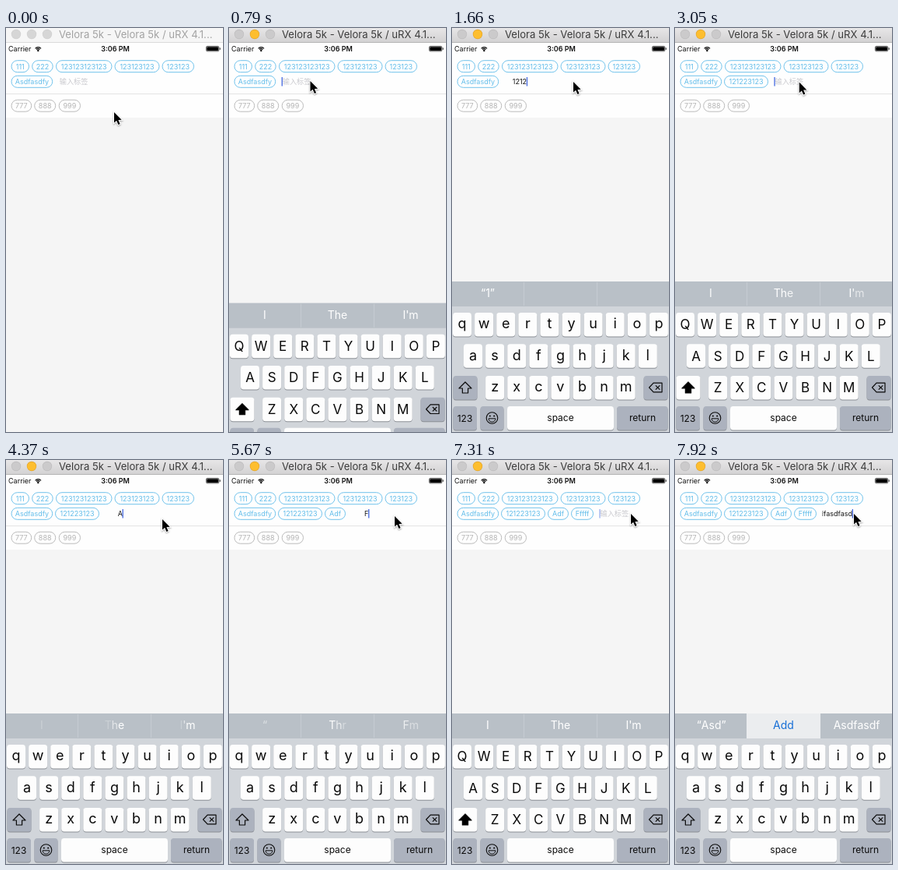
Write an HTML page with a canvas that moves like this. It is 279 by 518 pixels and loops after 8 s.

```html
<!DOCTYPE html>
<html lang="en">
<head>
<meta charset="utf-8">
<title>Tag input</title>
<style>
html, body { margin: 0; width: 100%; height: 100%; overflow: hidden; background: #f5f5f5; }
canvas { display: block; width: 279px; height: 518px; }
</style>
</head>
<body>
<canvas id="stage"></canvas>
<script>
const W = 279, H = 518, LOOP = 8000;
const canvas = document.getElementById('stage');
const ratio = window.devicePixelRatio || 1;
canvas.width = W * ratio;
canvas.height = H * ratio;
const c = canvas.getContext('2d');
const SANS = 'Inter, "Noto Sans CJK SC", "Noto Sans CJK", sans-serif';
const FOCUS = 610;
const BLUE = '#62bdea', GRAY = '#b4b4b4';

// Tags: left, width, label, time of appearance
const firstRow = [[7, 22.5, '111'], [33.7, 26.5, '222'], [64.5, 71.5, '123123123123'],
  [140, 57, '123123123'], [201, 40.5, '123123']];
const secondRow = [[7, 52.7, 'Asdfasdfy', 0], [63.5, 56, '121223123', 2920],
  [123.5, 26, 'Adf', 5000], [153.5, 28, 'Fffff', 6480]];
const thirdRow = [[7, 25.7, '777'], [36.7, 27, '888'], [68.2, 27.3, '999']];

// Typing: start, text, ms per key, time it is committed
const typing = [[1240, '121223123', 135, 2920], [4300, 'Adf', 150, 5000],
  [5580, 'Fffff', 120, 6480], [7400, 'Asdfasdfasd', 50, LOOP]];

const idle = ['I', 'The', "I'm"], blank = ['', '', ''];
// Suggestions: start, three words, middle one highlighted
const suggestions = [[0, idle], [1240, blank], [1420, ['“1”', '', '']], [1800, ['“12”', '', '']],
  [2060, ['“1212”', '', '']], [2400, ['“12122”', '', '']], [2920, idle], [4300, blank],
  [4440, ['“A”', 'And', 'As']], [4680, ['“Adf”', 'Add', 'Ads']], [5000, idle],
  [5580, ['“', 'Thr', 'Fm']], [5740, ['“F”', 'For', 'From']],
  [5960, ['“Fff”', 'Off', 'Free'], true], [6220, blank], [6480, idle],
  [7400, blank], [7480, ['“As”', 'And', 'As']], [7600, ['“Asd”', 'Add', 'Asdfasdf'], true]];

// Pointer: time, x, y
const pointer = [[60, 139, 108], [360, 104.5, 68], [1000, 104.5, 68], [1350, 156, 69],
  [2900, 156, 69], [3750, 201, 76], [5000, 201, 76], [5600, 213, 72],
  [6480, 213, 72], [7100, 230, 69]];

const clamp = v => Math.max(0, Math.min(1, v));

function font(size, weight = 400) {
  c.font = `${weight} ${size}px ${SANS}`;
}

function text(s, x, y, size, color, align = 'left', weight = 400) {
  font(size, weight);
  c.textAlign = align;
  c.fillStyle = color;
  c.fillText(s, x, y);
}

function rect(x, y, w, h, color) {
  c.fillStyle = color;
  c.fillRect(x, y, w, h);
}

function round(x, y, w, h, r) {
  c.beginPath();
  c.roundRect(x, y, w, h, r);
}

function poly(points, close = true) {
  c.beginPath();
  points.forEach(([x, y]) => c.lineTo(x, y));
  if (close) c.closePath();
}

function dot(x, y, r, color) {
  c.beginPath();
  c.arc(x, y, r, 0, 7);
  c.fillStyle = color;
  c.fill();
}

function stroke(color, width = 1) {
  c.strokeStyle = color;
  c.lineWidth = width;
  c.stroke();
}

function tag([x, w, label], y, color) {
  round(x, y, w, 15, 7.5);
  stroke(color, 0.9);
  text(label, x + w / 2, y + 10.8, 9, color, 'center');
}

function titleBar(active) {
  if (active) {
    const g = c.createLinearGradient(0, 0, 0, 18);
    g.addColorStop(0, '#e7e6e7');
    g.addColorStop(1, '#d3d2d3');
    rect(0, 0, W, 18, g);
  } else rect(0, 0, W, 18, '#f6f6f6');
  rect(0, 18, W, 1, active ? '#b5b5b5' : '#dadada');
  [13, 33, 53].forEach((x, i) => {
    const lit = active && i === 1;
    dot(x, 8, 6.2, lit ? '#e0a32e' : active ? '#bdbcbd' : '#d0d0d0');
    dot(x, 8, 5.6, lit ? '#fdbe2f' : active ? '#cbcacb' : '#d6d6d6');
  });
  text('Velora 5k - Velora 5k / uRX 4.1...', 68, 13, 13.1, active ? '#3c3c3c' : '#a3a3a3');
}

function statusBar() {
  text('Carrier', 3, 30, 9, '#111');
  for (const r of [4.9, 2.9]) {
    c.beginPath();
    c.arc(41.3, 29.6, r, -Math.PI * 0.77, -Math.PI * 0.23);
    stroke('#111', 1.3);
  }
  dot(41.3, 29, 1.2, '#111');
  text('3:06 PM', 140.5, 30, 9, '#111', 'center', 600);
  round(257.4, 23.4, 16.4, 6.4, 1.5);
  stroke('#111', 0.7);
  round(258.2, 24.2, 14.8, 4.8, 0.8);
  c.fillStyle = '#000';
  c.fill();
  rect(274.6, 25.4, 1, 2.4, '#111');
}

function inputField(t, entry, tags) {
  const [x, w] = tags[tags.length - 1];
  const left = x + w + 8, room = 38.5;
  let caret = left + 0.5, since = t - FOCUS;
  for (const [start, , , end] of typing) if (t >= end) since = t - end;
  if (entry) {
    const [start, full, step] = entry;
    const n = Math.min(full.length, Math.floor((t - start) / step) + 1);
    const shown = full.slice(0, n);
    since = t - start - (n - 1) * step;
    font(9);
    const width = c.measureText(shown).width;
    const from = width < room ? left + (room - width) / 2 : left + room - width;
    c.save();
    c.beginPath();
    c.rect(left, 60, room, 18);
    c.clip();
    text(shown, from, 72, 9, '#151515');
    c.restore();
    caret = from + width + 0.3;
  } else text('输入标签', left + 1, 72.2, 9.2, '#c9c9ce');
  if (t < FOCUS) return;
  const phase = since % 1000;
  c.globalAlpha = phase < 700 ? 1 - clamp((phase - 550) / 100) : clamp((phase - 750) / 150);
  rect(caret - 0.6, 63, 1.3, 11.5, '#4468e0');
  c.globalAlpha = 1;
}

function suggestionBar(t) {
  rect(0, 325, W, 32, '#b9c0c7');
  let i = suggestions.length - 1;
  while (suggestions[i][0] > t) i--;
  const [start, words, hot] = suggestions[i];
  const leaving = words === blank;
  const shown = leaving ? suggestions[i - 1][1] : words;
  if (hot) rect(92, 325, 95, 32, '#ebedef');
  else [92, 186].forEach(x => rect(x, 326, 1, 30, '#c6ccd2'));
  shown.forEach((word, k) => {
    const color = hot && k === 1 ? '#176fd6' : '#fff';
    font(14);
    let x = [46, 139.5, 233.5][k] - c.measureText(word).width / 2;
    [...word].forEach((ch, n) => {
      const dt = t - start;
      c.globalAlpha = leaving ? 1 - clamp((dt - 35 * n) / 95)
        : start ? clamp((dt - [40, 0, 20][k] - 25 * n) / 95) : 1;
      text(ch, x, 345, 14, color);
      x += c.measureText(ch).width;
    });
    c.globalAlpha = 1;
  });
}

function key(x, y, w, color = '#fdfdfd') {
  round(x, y + 1, w, 30.5, 3.7);
  c.fillStyle = '#8b8f95';
  c.fill();
  round(x, y, w, 30.5, 3.7);
  c.fillStyle = color;
  c.fill();
}

function keyboard(t, upper) {
  const dark = '#acb2be';
  c.save();
  c.translate(0, 193 * (1 - clamp((t - FOCUS) / 380)) ** 3);
  rect(0, 325, W, 193, '#d1d5da');
  suggestionBar(t);
  [['qwertyuiop', 13, 365], ['asdfghjkl', 27, 405.3], ['zxcvbnm', 55.1, 446]].forEach(([row, x0, y]) =>
    [...row].forEach((ch, i) => {
      const x = x0 + i * 28.1;
      key(x - 12, y, 24);
      text(upper ? ch.toUpperCase() : ch, x, y + (upper ? 21.3 : 20.3), upper ? 17 : 18, '#0a0a0a', 'center');
    }));

  c.lineJoin = 'round';
  key(1.5, 446, 31, upper ? '#fdfdfd' : dark);
  poly([[17, 454], [25, 462], [20.6, 462], [20.6, 468], [13.4, 468], [13.4, 462], [9, 462]]);
  if (upper) {
    c.fillStyle = '#000';
    c.fill();
  }
  stroke('#0a0a0a', 1.2);

  key(246.5, 446, 31, dark);
  poly([[253.5, 461], [259, 455.2], [270, 455.2], [270, 466.8], [259, 466.8]]);
  stroke('#0a0a0a', 1.2);
  for (const d of [-2.7, 2.7]) {
    poly([[261.8, 461 - d], [267.2, 461 + d]], false);
    stroke('#0a0a0a', 1.2);
  }

  key(1.5, 485, 30.5, dark);
  text('123', 16.5, 504.5, 12, '#0a0a0a', 'center');
  key(36.5, 485, 30, dark);
  c.beginPath();
  c.arc(51.5, 500, 7.3, 0, 7);
  stroke('#0a0a0a', 1.1);
  dot(48.8, 497.5, 1.1, '#0a0a0a');
  dot(54.2, 497.5, 1.1, '#0a0a0a');
  c.beginPath();
  c.arc(51.5, 500.8, 4.4, 0, Math.PI);
  c.closePath();
  stroke('#0a0a0a', 1);
  key(71, 485, 137);
  text('space', 139.5, 504, 12, '#0a0a0a', 'center');
  key(212, 485, 65.5, dark);
  text('return', 245, 504, 12, '#0a0a0a', 'center');
  c.restore();
}

function drawPointer(t) {
  let i = 0;
  while (i < pointer.length - 1 && pointer[i + 1][0] <= t) i++;
  const a = pointer[i], b = pointer[i + 1] || a;
  const p = clamp((t - a[0]) / (b[0] - a[0] || 1));
  const e = p * p * (3 - 2 * p);
  c.save();
  c.translate(a[1] + (b[1] - a[1]) * e, a[2] + (b[2] - a[2]) * e);
  poly([[0, 0], [0, 13.6], [3.1, 10.8], [5.4, 16], [7.6, 15], [5.4, 10], [9.7, 9.8]]);
  c.shadowColor = 'rgba(0,0,0,.35)';
  c.shadowBlur = 2 * ratio;
  c.shadowOffsetY = ratio;
  stroke('#fff', 2);
  c.shadowColor = 'transparent';
  c.fillStyle = '#000';
  c.fill();
  c.restore();
}

function draw(t) {
  c.setTransform(ratio, 0, 0, ratio, 0, 0);
  rect(0, 0, W, H, '#f5f5f5');
  rect(0, 18, W, 97, '#fefefe');
  rect(0, 84, W, 1, '#e3e3e3');
  titleBar(t >= 530);
  statusBar();
  const tags = secondRow.filter(item => t >= item[3]);
  const entry = typing.find(([start, , , end]) => t >= start && t < end);
  firstRow.forEach(item => tag(item, 41.7, BLUE));
  tags.forEach(item => tag(item, 61.3, BLUE));
  thirdRow.forEach(item => tag(item, 92.2, GRAY));
  inputField(t, entry, tags);
  if (t >= FOCUS) keyboard(t, !entry);
  drawPointer(t);
}

function tick() {
  draw(performance.now() % LOOP);
  requestAnimationFrame(tick);
}
tick();
</script>
</body>
</html>
```
